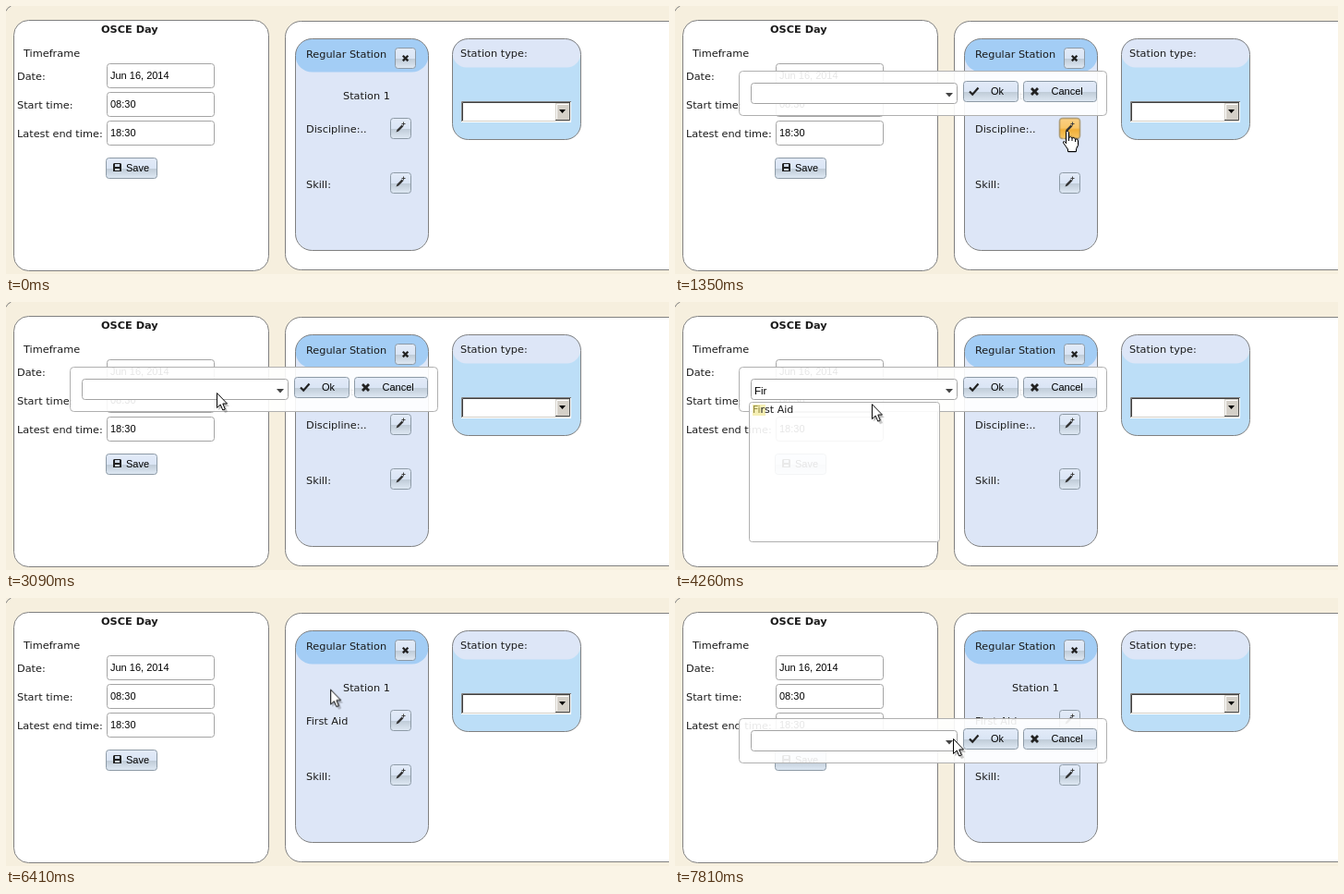
Write an HTML page that moves like this. It is 718x290 px and loops after 8000 ms.

```html
<!DOCTYPE html>
<html lang="en">
<head>
<meta charset="utf-8">
<title>Station editor</title>
<style>
html, body { margin: 0; width: 100%; height: 100%; overflow: hidden; background: #f6efde; }
svg { display: block; width: 718px; height: 290px; }
text { font: 11.3px "DejaVu Sans", sans-serif; fill: #1a1a1a; white-space: pre; }
.title { font-weight: bold; }
.field text, text.ui { font: 11px "Liberation Sans", Arial, sans-serif; fill: #000; }
text.entry { font-size: 11.5px; }
text.item { font-size: 11px; }
.line { stroke: #808080; }
.field rect { fill: #fff; stroke: #a4a4a4; }
.btn { fill: url(#glass); stroke: #8d9aa6; }
.hot { fill: url(#amber); stroke: #a08a5c; }
.veil { fill: #fff; fill-opacity: .9; stroke: #b0b0b0; }

/* Visibility switches */
.step { animation: 8s step-end infinite; }
.popup1 { animation-name: popup1; }
.popup2 { animation-name: popup2; }
.before { animation-name: before; }
.after { animation-name: after; }
.hot1 { animation-name: hot1; }
.hotOk { animation-name: hotOk; }
.hotSkill { animation-name: hotSkill; }
.hotOk2 { animation-name: hotOk2; }
.list { animation-name: list; }
.row { animation-name: row; }
.f { animation-name: f; }
.i { animation-name: i; }
.r { animation-name: r; }
.chosen { animation-name: chosen; }
.marked { animation-name: marked; }
.caret { animation-name: caret; }
.arrow { animation-name: arrow; }
.hand { animation-name: hand; }
.cursor { animation: move 8s cubic-bezier(.3,.3,.5,1) infinite; }

@keyframes popup1 { 0%, 79.75% { visibility: hidden } 16.875% { visibility: visible } }
@keyframes popup2 { 0% { visibility: hidden } 90.75%, 100% { visibility: visible } }
@keyframes before { 0% { visibility: visible } 79.75%, 100% { visibility: hidden } }
@keyframes after { 0% { visibility: hidden } 79.75%, 100% { visibility: visible } }
@keyframes hot1 { 0%, 24.25%, 100% { opacity: 0 } 5.8% { opacity: 1 } }
@keyframes hotOk { 0%, 79.75%, 100% { opacity: 0 } 72.9% { opacity: 1 } }
@keyframes hotSkill { 0%, 94%, 100% { opacity: 0 } 84.2% { opacity: 1 } }
@keyframes hotOk2 { 0%, 96.5%, 100% { opacity: 0 } 95.4% { opacity: 1 } }
@keyframes list { 0%, 63.25%, 100% { opacity: 0 } 42.5% { opacity: 1 } }
@keyframes row { 0%, 63.25%, 100% { opacity: 0 } 54% { opacity: 1 } }
@keyframes f { 0%, 63.25%, 100% { fill-opacity: 0 } 41.5% { fill-opacity: 1 } }
@keyframes i { 0%, 63.25%, 100% { fill-opacity: 0 } 44% { fill-opacity: 1 } }
@keyframes r { 0%, 63.25%, 100% { fill-opacity: 0 } 46.375% { fill-opacity: 1 } }
@keyframes chosen { 0%, 79.75%, 100% { opacity: 0 } 63.25% { opacity: 1 } }
@keyframes marked { 0%, 76%, 100% { opacity: 0 } 64.5% { opacity: 1 } }
@keyframes caret {
  0%, 38.625%, 63.25%, 100% { opacity: 0; transform: none }
  32% { opacity: 1; transform: none }
  41.5% { opacity: 1; transform: translateX(7px) }
  44% { opacity: 1; transform: translateX(10px) }
  46.375%, 59.625% { opacity: 1; transform: translateX(13px) }
  53% { opacity: 0; transform: translateX(13px) }
}
@keyframes hand {
  0%, 24.25%, 79.75%, 94%, 96.5%, 100% { opacity: 0 }
  5.8%, 72.9%, 84.2%, 95.4% { opacity: 1 }
}
@keyframes arrow {
  0%, 5.8%, 72.9%, 84.2%, 95.4% { opacity: 0 }
  2.375%, 24.25%, 79.75%, 94%, 96.5%, 100% { opacity: 1 }
}
@keyframes move {
  0%, 2.375% { transform: translate(373px, 285px) }
  7.25%, 9.25% { transform: translate(438px, 128px) }
  11.125%, 23.875% { transform: translate(425px, 135px) }
  32%, 51.75% { transform: translate(228px, 98px) }
  53.25% { transform: translate(213px, 110px) }
  54.75%, 58% { transform: translate(203px, 122px) }
  60.75%, 70.24% { transform: translate(203px, 119px) }
  70.25% { transform: translate(249px, 115px) }
  76%, 79.75% { transform: translate(345px, 92px) }
  86.25%, 93.5% { transform: translate(438px, 192px) }
  97.625%, 100% { transform: translate(301px, 152px) }
}
</style>
</head>
<body>
<svg viewBox="0 0 718 290" xmlns="http://www.w3.org/2000/svg">
  <defs>
    <linearGradient id="glass" x2="0" y2="1">
      <stop offset="0" stop-color="#e3ebf8"/>
      <stop offset=".5" stop-color="#dae5f5"/>
      <stop offset=".54" stop-color="#c0ccd8"/>
      <stop offset="1" stop-color="#dfe9f4"/>
    </linearGradient>
    <linearGradient id="amber" x2="0" y2="1">
      <stop offset="0" stop-color="#fbd085"/>
      <stop offset=".5" stop-color="#f9c566"/>
      <stop offset=".54" stop-color="#f0ad35"/>
      <stop offset="1" stop-color="#f9c765"/>
    </linearGradient>
    <rect id="square" width="22" height="22" rx="3"/>
    <rect id="okBox" x="312.5" y="81.5" width="59" height="22" rx="3"/>
    <g id="pencil">
      <path d="M6.5 15.5l1-2.7 5.2-5.2 1.7 1.7-5.2 5.2z" fill="#333"/>
      <path d="M14.5 4.5v4M12.5 6.5h4" stroke="#444"/>
    </g>
    <path id="cross" d="M0 2L2 0 4.500 2.500 7 0 9 2 6.500 4.500 9 7 7 9 4.500 6.500 2 9 0 7 2.500 4.500z" fill="#222"/>
    <g id="panel">
      <rect class="veil" x="69.500" y="70.500" width="398" height="48" rx="4"/>
      <g class="field"><rect x="82.500" y="83.500" width="223" height="22" rx="3"/></g>
      <path d="M293 94h8l-4 4.500z" fill="#444"/>
      <use href="#okBox" class="btn"/>
      <rect class="btn" x="377.500" y="81.500" width="79" height="22" rx="3"/>
    </g>
    <g id="labels">
      <path d="M319 92.500l3.200 3.200 6.300-7.200" fill="none" stroke="#222" stroke-width="2.200"/>
      <text class="ui" x="342" y="96">Ok</text>
      <use href="#cross" x="385" y="88"/>
      <text class="ui" x="407.500" y="96">Cancel</text>
    </g>
  </defs>

  <rect width="718" height="290" fill="#f6efde"/>
  <path class="line" d="M0 5.500Q1 2 5.500 0" fill="none"/>

  <!-- Day panel -->
  <rect class="line" x="8.500" y="15.500" width="276" height="271" rx="16" fill="#fff"/>
  <text class="title" x="103" y="29">OSCE Day</text>
  <text x="19" y="55">Timeframe</text>
  <text x="12" y="80">Date:</text>
  <text x="12" y="111">Start time:</text>
  <text x="12" y="142">Latest end time:</text>
  <g class="field">
    <rect x="109.500" y="62.500" width="116" height="26" rx="3"/>
    <rect x="109.500" y="93.500" width="116" height="26" rx="3"/>
    <rect x="109.500" y="124.500" width="116" height="26" rx="3"/>
    <text x="113" y="79">Jun 16, 2014</text>
    <text x="113" y="110">08:30</text>
    <text x="113" y="141">18:30</text>
  </g>
  <rect class="btn" x="108.500" y="164.500" width="55" height="22" rx="3"/>
  <path d="M117 170h7l1 1v8h-9v-8z" fill="#222"/>
  <path d="M118 171h5v3h-5zM118 176h5v2h-5z" fill="#cdd8e6"/>
  <text class="ui" x="130" y="179">Save</text>

  <!-- Station panel -->
  <rect class="line" x="302.500" y="16.500" width="440" height="269" rx="17" fill="#fff"/>
  <rect x="313.500" y="35.500" width="144" height="229" rx="18" fill="#dde6f7"/>
  <rect x="313.500" y="35.500" width="144" height="36" rx="18" fill="#a3cdf5"/>
  <rect class="line" x="313.500" y="35.500" width="144" height="229" rx="18" fill="none"/>
  <text x="325" y="56">Regular Station</text>
  <use href="#square" class="btn" x="421.500" y="45.500"/>
  <use href="#cross" transform="translate(429 53) scale(.8)"/>
  <text x="365" y="101">Station 1</text>
  <text class="step before" x="325" y="137">Discipline:..</text>
  <text class="step after" x="325" y="137">First Aid</text>
  <use href="#square" class="btn" x="416.500" y="121.500"/>
  <use href="#square" class="hot step hot1" x="416.500" y="121.500"/>
  <use href="#pencil" x="416" y="121"/>
  <text x="325" y="197">Skill:</text>
  <use href="#square" class="btn" x="416.500" y="180.500"/>
  <use href="#square" class="hot step hotSkill" x="416.500" y="180.500"/>
  <use href="#pencil" x="416" y="180"/>

  <!-- Station type -->
  <rect x="483.500" y="35.500" width="139" height="109" rx="17" fill="#bcdef7"/>
  <rect x="483.500" y="35.500" width="139" height="31" rx="15.500" fill="#dde6f7"/>
  <rect class="line" x="483.500" y="35.500" width="139" height="109" rx="17" fill="none"/>
  <text x="492" y="55">Station type:</text>
  <rect x="493" y="103" width="119" height="23" fill="#fff"/>
  <path d="M493.500 125V103.500H612" fill="none" stroke="#808080"/>
  <path d="M494.500 124V104.500H611" fill="none" stroke="#404040"/>
  <path d="M494 124.500H610.500V105" fill="none" stroke="#d4d0c8"/>
  <rect x="595" y="105" width="16" height="19" fill="#d4d0c8"/>
  <path d="M595 123.500H610.500V105" fill="none" stroke="#505050"/>
  <path d="M596.500 122V106.500H609" fill="none" stroke="#fff"/>
  <path d="M599 112h7l-3.500 4z" fill="#000"/>

  <!-- Discipline popup -->
  <g class="step popup1">
    <use href="#panel"/>
    <use href="#okBox" class="hot step hotOk"/>
    <use href="#labels"/>
    <text class="ui entry" x="86" y="99.500"><tspan class="step f">F</tspan><tspan class="step i">i</tspan><tspan class="step r">r</tspan></text>
    <text class="ui entry step chosen" x="86" y="99.500">First Aid</text>
    <g class="step marked">
      <rect x="86" y="89" width="43" height="13" fill="#0a246a"/>
      <text class="ui entry" x="86" y="99.500" style="fill:#fff">First Aid</text>
    </g>
    <rect class="step caret" x="86" y="89" width="1" height="12"/>
    <g class="step list">
      <rect class="veil" x="80.500" y="108.500" width="206" height="151" rx="3"/>
      <rect class="step row" x="81" y="109" width="205" height="15" fill="#e8eef7"/>
      <rect x="84" y="111" width="14" height="12" fill="#f5efb4"/>
      <text class="item" x="84" y="120"><tspan fill="#8d843c">Fi</tspan>rst Aid</text>
    </g>
  </g>

  <!-- Skill popup -->
  <g class="step popup2" transform="translate(0 60)">
    <use href="#panel"/>
    <use href="#okBox" class="hot step hotOk2"/>
    <use href="#labels"/>
  </g>

  <g class="cursor">
    <g class="step arrow">
      <path d="M2 3v16l4-3 3 6 3-1-2-6h4z" fill="#000" opacity=".22"/>
      <path d="M.5.500V16.500L4.200 13 6.800 19 9.300 18 6.800 12H11.500z" fill="#fff" stroke="#000"/>
    </g>
    <g class="step hand">
      <path d="M-1 3V14l-4-2 6 12h8l4-8V9z" fill="#000" opacity=".18"/>
      <path d="M-1.500 1.500Q0-1 1.500 1.500V7.500Q3.500 5.500 5 8 7 6.500 8.500 9 11 8 11.500 11V15.500L9.500 19.500V22.500H.5V20.500L-4.500 13.500Q-5-.5 -5 12.500 -4 10-1.500 13.500z" fill="#fff" stroke="none"/>
      <path d="M-1.500 14V1.500Q0-1 1.500 1.500V11M1.500 7.500Q3.500 5.500 5 8V11M5 8Q7 6.500 8.500 9V12M8.500 9Q11 8 11.500 11V15.500L9.500 19.500V22.500H.5V20L-4.500 13Q-4.500 9.500-1.500 13.500" fill="none" stroke="#000"/>
    </g>
  </g>
</svg>
</body>
</html>
```
